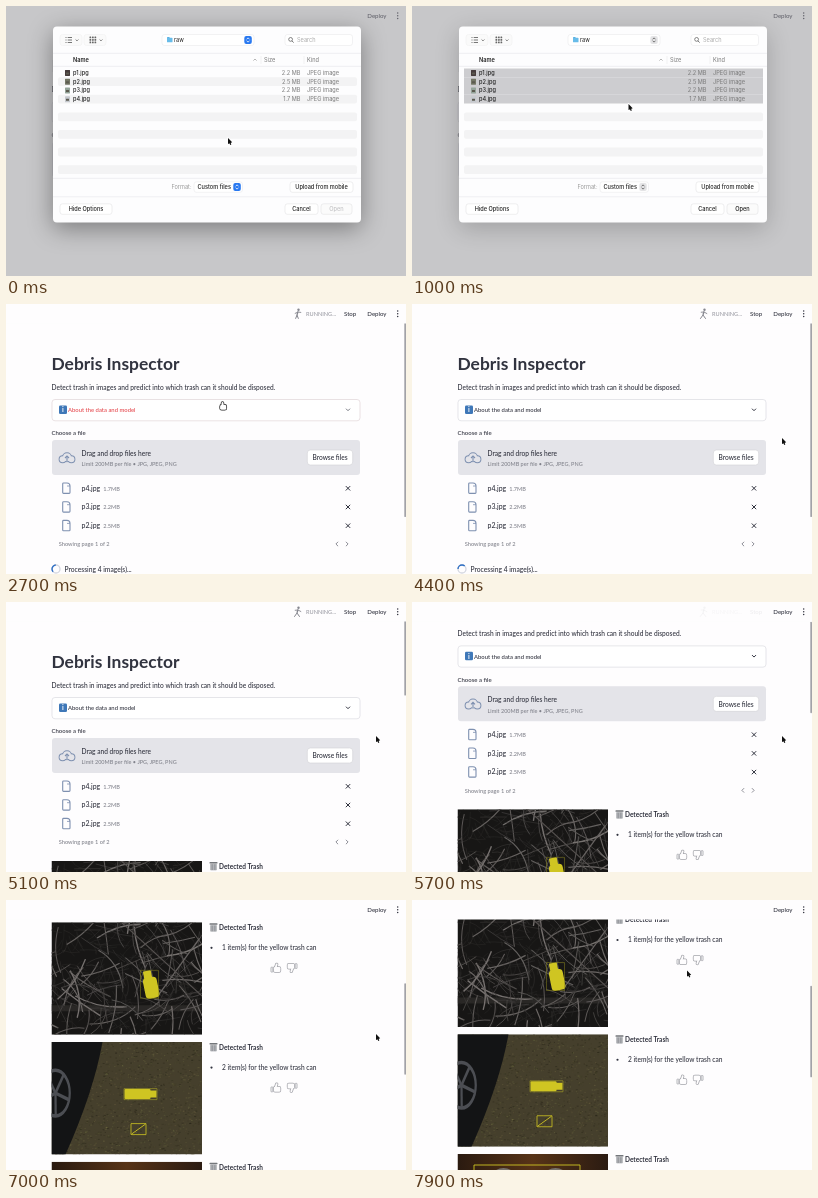
An HTML page with a canvas for the animation above (8 s loop, 400 by 270 pixels).

```html
<!DOCTYPE html>
<html lang="en">
<head>
<meta charset="utf-8">
<title>Debris Inspector</title>
<style>
html, body { margin: 0; height: 100%; overflow: hidden; background: #fefdfe; }
canvas { display: block; width: 100vw; height: 100vh; }
</style>
</head>
<body>
<canvas width="400" height="270"></canvas>
<script>
const c = document.querySelector('canvas').getContext('2d');
const LOOP = 8000, WEB = 'Lato, sans-serif', MAC = 'Inter, sans-serif';
const INK = '#31333f', GREY = '#80828b', ICON = '#7e90b0', PAGE = '#fefdfe', PANEL = '#e4e4e9';
const YELLOW = '#cfc522', BLUE = '#2878f0', RULE = '#e5e5e7';
const BODY = 6.6, SMALL = 5.6;
const LEFT = 45.5, RIGHT = 354, PHOTO_W = 150.5, PHOTO_H = 112.5;
const SIZES = [2.2, 2.5, 2.2, 1.7];
const TAU = Math.PI * 2, DOWN = 0, UP = Math.PI, PREV = Math.PI / 2, NEXT = -Math.PI / 2;

const progress = (t, from, to) => Math.max(0, Math.min(1, (t - from) / (to - from)));

function ease(t, from, to) {
  const p = progress(t, from, to);
  return p * p * (3 - 2 * p);
}

function random(seed) {
  return () => (seed = (seed * 16807) % 2147483647) / 2147483647;
}

function at(x, y, draw, angle = 0) {
  c.save();
  c.translate(x, y);
  c.rotate(angle);
  draw();
  c.restore();
}

function text(s, x, y, size = BODY, color = INK, { weight = 500, align = 'left', font = WEB } = {}) {
  c.font = `${weight} ${size}px ${font}`;
  c.textAlign = align;
  c.fillStyle = color;
  c.fillText(s, x, y);
}

function paint(fill, stroke, width) {
  if (fill) { c.fillStyle = fill; c.fill(); }
  if (stroke) { c.strokeStyle = stroke; c.lineWidth = width; c.stroke(); }
}

function box(x, y, w, h, r, fill, stroke, width = 0.6) {
  c.beginPath();
  c.roundRect(x, y, w, h, r);
  paint(fill, stroke, width);
}

function circle(x, y, r, fill, stroke, width = 0.8) {
  c.beginPath();
  c.arc(x, y, r, 0, TAU);
  paint(fill, stroke, width);
}

function line(x1, y1, x2, y2, color, width = 0.8) {
  c.beginPath();
  c.moveTo(x1, y1);
  c.lineTo(x2, y2);
  paint(null, color, width);
}

function chevron(x, y, size, direction, color, width = 0.9) {
  at(x, y, () => {
    c.beginPath();
    for (const side of [-1, 0, 1]) c.lineTo(side * size, side ? -size / 2 : size / 2);
    paint(null, color, width);
  }, direction);
}

// Strokes a group of parts, then fills them, leaving only the outer outline.
function outlined(parts, fill, stroke, width) {
  parts(null, stroke, width);
  parts(fill);
}

// --- photos ---

function branches() {
  const rnd = random(71);
  box(0, 0, PHOTO_W, PHOTO_H, 0, '#171615');
  line(0, 86, PHOTO_W, 86, '#292725', 6);
  for (let i = 0; i < 380; i++) {
    const x = rnd() * PHOTO_W, y = rnd() * PHOTO_H, glow = rnd() ** 4;
    const angle = rnd() * TAU, length = 6 + rnd() * 22 + glow * 30, bend = angle + rnd() - 0.5;
    c.beginPath();
    c.moveTo(x, y);
    c.quadraticCurveTo(x + Math.cos(bend) * length / 2, y + Math.sin(bend) * length / 2,
      x + Math.cos(angle) * length, y + Math.sin(angle) * length);
    paint(null, `hsl(20 3% ${17 + glow * 28}%)`, 0.4 + glow);
  }
  line(148, 16, 106, 74, '#686462', 1.2);
  line(70, 0, 151, 74, '#565250', 1.1);
  at(99, 62, () => {
    box(-5, -14, 8, 10, 1, YELLOW);
    box(-7, -7, 14, 21, 4, YELLOW);
  }, -0.2);
  box(89, 48, 18, 28, 0, null, '#8b841d', 0.5);
}

function lawn() {
  const rnd = random(29);
  box(0, 0, PHOTO_W, PHOTO_H, 0, '#453f2c');
  for (let i = 0; i < 1800; i++) {
    c.fillStyle = `hsla(${40 + rnd() * 25} 25% ${8 + rnd() * 30}% / .4)`;
    c.fillRect(rnd() * PHOTO_W, rnd() * PHOTO_H, 1 + rnd(), 1);
  }
  c.beginPath();
  c.moveTo(0, 0);
  c.lineTo(51, 0);
  c.quadraticCurveTo(42, 50, 14, PHOTO_H);
  c.lineTo(0, PHOTO_H);
  paint('#131415');
  at(4, 51, () => {
    c.scale(0.75, 1.2);
    circle(0, 0, 19, null, '#4c4e53', 3);
    for (let a = 0.3; a < TAU; a += TAU / 5) line(0, 0, Math.cos(a) * 18, Math.sin(a) * 18, '#4c4e53', 3);
  });
  box(73, 47, 26, 10, 1, YELLOW);
  box(98, 48.5, 7, 7, 0, YELLOW);
  box(72.5, 46.5, 33, 11, 0, null, '#a9a127');
  box(79.5, 81.5, 15, 11, 0, null, YELLOW, 0.8);
  line(80, 92, 94, 82, YELLOW, 0.9);
}

function table() {
  const glow = c.createLinearGradient(0, 0, PHOTO_W, 0);
  ['#2a1a10', '#573317', '#2b1b12'].forEach((color, i) => glow.addColorStop(i / 2, color));
  box(0, 0, PHOTO_W, PHOTO_H, 0, glow);
  for (const x of [46, 98]) circle(x, 28, 14, '#77716b');
  box(16.5, 11, 106, 92, 0, null, YELLOW, 0.9);
}

// --- page ---

function thumb(x, y, angle) {
  const color = '#a3a4aa';
  at(x, y, () => {
    box(-5, -0.6, 1.8, 4.8, 0.3, null, color, 0.8);
    outlined((...style) => {
      box(-2.2, -0.8, 6.6, 5, 1.2, ...style);
      at(0, -1, () => box(-1, -3.5, 1.8, 4.5, 0.8, ...style), 0.3);
    }, PAGE, color, 1.5);
  }, angle);
}

function trashCan(x, y) {
  box(x + 0.8, y + 1.5, 6.4, 7, 0.8, '#c6c8cb');
  box(x, y, 8, 1.5, 0.5, '#74777b');
  for (let i = 1; i < 5; i++) line(x + i * 1.6, y + 2.2, x + i * 1.6, y + 8, '#6c6f74', 0.6);
}

function result(index, photo) {
  const top = 259 + index * 119.75;
  at(LEFT, top, () => {
    c.beginPath();
    c.rect(0, 0, PHOTO_W, PHOTO_H);
    c.clip();
    photo();
  });
  trashCan(203.5, top + 1);
  text('Detected Trash', 213, top + 7.9, 6.5, INK, { weight: 700 });
  circle(205.5, top + 25.5, 1.1, INK);
  text(`${index === 1 ? 2 : 1} item(s) for the yellow trash can`, 216, top + 27.6);
  thumb(270, top + 45.5, 0);
  thumb(286, top + 45.5, Math.PI);
}

function expander(hovered) {
  box(46, 95.5, 308, 21.3, 3, '#fff', hovered ? '#dccfd2' : '#d6d6dc');
  box(53, 101.5, 8, 8.5, 1.3, '#3f78b8');
  text('i', 57, 108.4, 7, '#fff', { weight: 700, align: 'center' });
  text('About the data and model', 62, 108.4, 5.9, hovered ? '#e5484d' : INK);
  chevron(342, 105.7, 2, DOWN, hovered ? '#777982' : INK, 1);
}

function uploader() {
  text('Choose a file', LEFT, 131.3, 6);
  box(46, 136, 308, 35, 3, PANEL);
  outlined((...style) => {
    for (const i of [-1, 1, 0]) circle(61 + i * 4.4, 155.2 - (i ? 0 : 2), i ? 3 : 4, ...style);
  }, PANEL, ICON, 2);
  line(61, 157, 61, 152.5, ICON, 1.1);
  chevron(61, 153, 2, UP, ICON, 1.1);
  text('Drag and drop files here', 75.5, 152);
  text('Limit 200MB per file • JPG, JPEG, PNG', 75.5, 162.3, 5.5, GREY);
  box(301.3, 146, 45.4, 15, 3, '#fff', '#d0d0d6');
  text('Browse files', 324, 156.2, BODY, INK, { align: 'center' });
}

function fileList() {
  for (let row = 0; row < 3; row++) {
    const index = 3 - row, y = 184 + row * 18.7;
    box(56.7, y - 5, 7.3, 10.4, [0.8, 3, 0.8, 0.8], null, ICON, 1.1);
    line(61, y - 2, 64, y - 2, ICON);
    text(`p${index + 1}.jpg`, 75.5, y + 2.6, 6.9);
    text(`${SIZES[index]}MB`, 97.3, y + 2.6, SMALL, GREY);
    for (const s of [-2.2, 2.2]) line(342 - s, y - 1.9, 342 + s, y + 2.5, INK, 1);
  }
  text('Showing page 1 of 2', 52.7, 242.2, 5.7, GREY);
  chevron(331, 240, 2.2, PREV, GREY);
  chevron(341, 240, 2.2, NEXT, GREY);
}

function spinner(t) {
  const turn = t / 800 * TAU;
  circle(50, 265, 4, null, '#d3d6df', 1.3);
  c.beginPath();
  c.arc(50, 265, 4, turn, turn + 2.3);
  paint(null, '#2f6fc4', 1.4);
  text('Processing 4 image(s)...', 58.5, 267.5, 6.7);
}

function runner(t) {
  const swing = Math.sin(t / 110), color = '#85868e';
  circle(292.5, 5.8, 1.2, color);
  line(292, 7.3, 291, 11, color, 1.3);
  for (const side of [-1, 1]) {
    line(292, 8, 292 + side * 3.2, 9 + side * swing, color, 0.9);
    line(291, 11, 291 + side * (2 + swing), 14.8, color, 1);
  }
}

function header(t) {
  box(0, 0, 400, 19.5, 0, PAGE);
  text('Deploy', 361.3, 12, 6.1);
  for (let i = 0; i < 3; i++) circle(391.7, 7 + i * 2.7, 0.75, INK);
  if (t < 2000) return;
  c.globalAlpha = 1 - progress(t, 5480, 5720);
  runner(t);
  text('RUNNING...', 300, 12, SMALL, '#999aa2');
  text('Stop', 338, 12, 6.1);
  c.globalAlpha = 1;
}

function page(t, scroll, hovered) {
  const listed = t >= 1800, done = t >= 4900;
  box(0, 0, 400, 270, 0, PAGE);
  at(0, -scroll, () => {
    text('Debris Inspector', LEFT, 66.3, 17.4, INK, { weight: 700 });
    text('Detect trash in images and predict into which trash can it should be disposed.', LEFT, 86);
    expander(hovered);
    uploader();
    if (listed) fileList();
    if (t >= 2100 && !done) spinner(t);
    if (done) [branches, lawn, table].forEach((photo, i) => result(i, photo));
  });
  if (listed) box(398.3, 2 + scroll * 0.343, 1.7, done ? 91.5 : 211, 1, '#a2a2a7');
  header(t);
}

// --- file dialog ---

const label = (s, x, y, color = '#222', options) => text(s, x, y, SMALL, color, { weight: 400, font: MAC, ...options });

function stepper(x, y, active) {
  box(x, y, 7.5, 8, 2, active ? BLUE : '#e4e4e6');
  const color = active ? '#fff' : '#555';
  chevron(x + 3.75, y + 2.6, 1.5, UP, color, 0.8);
  chevron(x + 3.75, y + 5.4, 1.5, DOWN, color, 0.8);
}

function button(s, x, y, w, color = '#222', fill = '#fff') {
  box(x, y, w, 10.5, 2.5, fill, '#dcdcde', 0.5);
  label(s, x + w / 2, y + 7.4, color, { align: 'center', weight: 500 });
}

function toolbar(active) {
  for (const x of [54, 78]) {
    box(x, 28.5, 22, 11, 2.5, '#fafafa', '#eee', 0.5);
    chevron(x + 17, 34.2, 1.4, DOWN, '#666', 0.8);
  }
  for (let i = 0; i < 3; i++) {
    const y = 31.5 + i * 2.5;
    line(59.5, y, 60.5, y, '#555');
    line(61.7, y, 66, y, '#555');
    for (let j = 0; j < 3; j++) box(83.5 + j * 2.5, y - 0.9, 1.7, 1.7, 0.3, '#666');
  }
  box(156, 28.5, 92, 11, 2.5, '#fff', RULE, 0.5);
  box(161, 31, 2.5, 2, 0.4, '#55aee0');
  box(161, 31.8, 5.5, 4.5, 0.6, '#68bce9');
  label('raw', 168, 36.2);
  stepper(238.3, 30, active);
  box(279, 28.5, 67.5, 11, 2.5, '#fff', RULE, 0.5);
  circle(284.6, 33.4, 1.9, null, '#555', 0.7);
  line(286, 34.9, 287.6, 36.6, '#555');
  label('Search', 291, 36.2, '#aaa');
}

function fileTable(selected, active) {
  label('Name', 67, 56, '#222', { weight: 600 });
  chevron(249, 53.8, 1.6, UP, '#999', 0.7);
  label('Size', 258, 56, '#777');
  label('Kind', 301, 56, '#777');
  for (const x of [255, 298]) line(x, 50, x, 58, RULE, 0.5);

  for (let row = 0; row < 12; row++) {
    const y = 62.4 + row * 8.8, isFile = row < SIZES.length, lit = isFile && selected;
    if (lit) box(52, y, 299, 8.8, 0, active ? '#2364d2' : '#cdcdd0');
    else if (row % 2) box(52, y, 299, 8.8, 2, '#f3f3f4');
    if (!isFile) continue;
    const dim = lit && active ? '#fff' : '#777';
    box(59, y + 1.5, 5, 6, 0.4, `hsl(${row * 70} 8% ${25 + row * 18}%)`);
    box(60, y + 4, 3, 2, 0.3, '#5c5a50');
    label(`p${row + 1}.jpg`, 67, y + 6.4, lit && active ? '#fff' : '#222', { weight: 500 });
    label(`${SIZES[row]} MB`, 294.5, y + 6.4, dim, { align: 'right' });
    label('JPEG image', 301, y + 6.4, dim);
  }
}

function dialog(t) {
  const selected = t >= 400, active = t < 1000, primary = selected && active;

  c.shadowColor = `rgba(0,0,0,${active ? 0.38 : 0.2})`;
  c.shadowBlur = 24;
  c.shadowOffsetY = 6;
  box(47, 20.5, 308, 196, 4, '#fdfdfe');
  c.shadowColor = 'transparent';

  for (const y of [47.3, 60.3, 172.3, 190.8]) line(47, y, 355, y, RULE, 0.6);
  toolbar(active);
  fileTable(selected, active);

  label('Format:', 185.5, 183, '#999', { align: 'right' });
  box(188, 175.8, 48.5, 10.5, 2.5, '#fff', RULE, 0.5);
  label('Custom files', 191.5, 183.1, '#222', { weight: 500 });
  stepper(227.3, 177, active);
  button('Upload from mobile', 284, 175.8, 63);
  button('Hide Options', 54, 197.8, 52);
  button('Cancel', 279, 197.8, 33);
  button('Open', 315, 197.8, 31, primary ? '#fff' : selected ? '#222' : '#c4c4c6', primary ? BLUE : '#fbfbfb');
}

// --- pointer ---

function hand() {
  outlined((...style) => {
    box(-1, 0, 2, 6, 1, ...style);
    box(-2.4, 2.8, 6.2, 5, 1.6, ...style);
  }, '#fff', '#222', 1.5);
}

function arrow() {
  outlined((fill, stroke, width) => {
    c.beginPath();
    c.lineTo(0, 0);
    c.lineTo(0, 6);
    c.lineTo(4.2, 4.3);
    c.closePath();
    paint(fill, stroke, width);
    at(1.6, 4, () => box(-0.6, 0, 1.2, 3, 0, fill, stroke, width), -0.4);
  }, '#111', '#fff', 1.2);
}

function draw(t) {
  const scroll = 222 * ease(t, 5460, 6230) + 22.5 * ease(t, 6700, 7200);
  const reach = ease(t, 100, 600), leave = ease(t, 3300, 3900), back = ease(t, 7600, 7900);
  const x = 222 - 5.5 * reach + 153.5 * leave - 95 * back;
  const y = 132 - 34 * reach + 36 * leave - 63.5 * back;
  const closing = progress(t, 1350, 1560);
  const onExpander = t >= 1400 && y < 117 && !back;

  page(t, scroll, onExpander && t >= 1700);
  if (closing < 1) {
    c.globalAlpha = 1 - closing;
    box(0, 0, 400, 270, 0, 'rgba(148,147,152,.51)');
    at(0, -14 * closing, () => dialog(t));
    c.globalAlpha = 1;
  }
  at(x, y, onExpander ? hand : arrow);
}

function frame(now) {
  draw(now % LOOP);
  requestAnimationFrame(frame);
}
requestAnimationFrame(frame);
</script>
</body>
</html>
```
